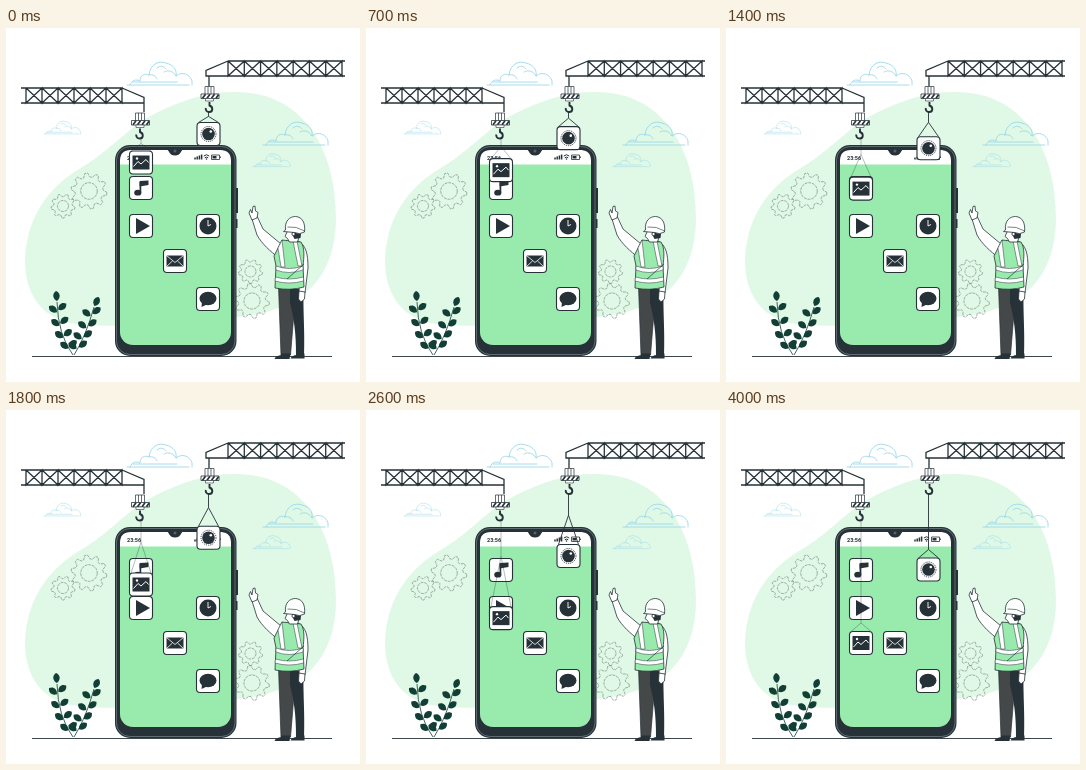
Write an HTML page that moves like this. It is 354x354 px and loops after 5 s.

```html
<!DOCTYPE html>
<html lang="en">
<head>
<meta charset="utf-8">
<title>App installation</title>
<style>
html, body { margin: 0; width: 100%; height: 100%; overflow: hidden; background: #fff; }
svg { display: block; width: 100vw; height: 100vh; }
.line { fill: none; stroke: #263238; }
.paper { fill: #fff; stroke: #263238; stroke-width: .8; stroke-linejoin: round; }
.dark { fill: #263238; }
.cloud { fill: none; stroke: #92d3e9; stroke-width: .8; stroke-linecap: round; }
.gear { fill: none; stroke: #6a7c77; stroke-width: .6; stroke-dasharray: 3 .8; }
text { font: bold 5.5px Roboto, Arial, sans-serif; fill: #263238; }
</style>
</head>
<body>
<svg viewBox="0 0 354 354">
  <defs>
    <g id="cloud">
      <path d="M0 24H62M6 21H50M3 24C5 19 9 18 13 20C13 14 18 12 22 14C23 4 31 -1 39 2C47 4 50 9 49 15C55 10 63 13 65 20V24M22 14C26 13 29 15 30 18M37 11C42 8 47 11 49 15M30 7C33 4 37 5 39 8"/>
    </g>
    <g id="tile"><rect class="paper" x="-11.5" y="-11.5" width="23" height="23" rx="3.5" style="stroke-width:1.1"/></g>
    <g id="tackle">
      <path class="line" d="M-4 8V.5H5V8M-1 .5V8M2 .5V8" stroke-width=".7"/>
      <rect class="paper" x="-8" y="8" width="18" height="4.5"/>
      <path class="line" d="M-6.500 12.300l3-4M-2 12.300l3-4M2.500 12.300l3-4M7 12.300l2.500-3.500" stroke-width="1.700"/>
      <path class="paper" d="M-3.500 12.500H4.500V15H-3.500Z" style="stroke-width:.6"/>
      <path class="line" d="M.5 16V19.500C4.500 21 4 26 .2 26C-2.500 26 -3.500 24 -3.200 22" stroke-width="1.900"/>
    </g>
  </defs>

  <path fill="#e0f9e6" d="M19 233C20 198 35 164 73 141C103 124 120 101 148 86C176 72 200 64 228 64C298 63 330 122 330 190C330 248 298 281 238 288C180 299 110 300 72 296C38 293 19 268 19 233Z"/>

  <g class="cloud">
    <use href="#cloud" x="121" y="33"/>
    <use href="#cloud" transform="translate(38 92.500) scale(.56)"/>
    <use href="#cloud" x="257" y="93"/>
    <use href="#cloud" transform="translate(247 125) scale(.57)"/>
  </g>
  <g id="gears" class="gear"></g>
  <path class="line" d="M26 328.500H326" stroke-width=".9"/>
  <g id="plant" fill="#123f35" stroke="#123f35" stroke-width=".8"></g>

  <!-- phone -->
  <path class="dark" d="M229 160h3v25h-3zM229 191h2.500v9h-2.500z"/>
  <rect class="dark" x="109" y="117" width="121.500" height="211" rx="15"/>
  <rect x="110.500" y="118.500" width="118.500" height="208" rx="13.500" fill="none" stroke="#78868b" stroke-width=".7"/>
  <rect x="114" y="122" width="111" height="195" rx="13" fill="#98ebad"/>
  <path fill="#fff" d="M114 136.500V133Q114 122 125 122H214Q225 122 225 133V136.500Z"/>
  <path class="dark" d="M161 121.500C163 122 163 127.500 169 127.500S175 122 177 121.500Z"/>
  <circle cx="169" cy="123" r="1.500" fill="#53636a"/>
  <text x="121" y="131.500">23:56</text>
  <path class="line" d="M189 131.500v-2M191.200 131.500v-3M193.400 131.500v-4M195.600 131.500v-5" stroke-width="1.500"/>
  <path class="line" d="M197.800 128Q200.500 125.500 203.200 128M198.800 129.800Q200.500 128.300 202.200 129.800" stroke-width="1"/>
  <circle class="dark" cx="200.500" cy="131" r=".8"/>
  <path class="line" d="M205.500 127H213.500V131.500H205.500ZM214.500 128.500v1.500" stroke-width=".8"/>
  <path class="dark" d="M206.500 128h4v2.500h-4z"/>

  <!-- app tiles -->
  <g transform="translate(135 160)">
    <use href="#tile"/>
    <path class="line" d="M-.6 4.500V-6" stroke-width="1.700"/>
    <path class="dark" d="M-1.400 -7L7.500 -7.500V-3L-1.400 -1.500Z"/>
    <ellipse class="dark" cx="-3.200" cy="4.700" rx="3.600" ry="2.900"/>
  </g>
  <g transform="translate(135 198)">
    <use href="#tile"/><path class="dark" d="M-5 -8L9 0L-5 8Z"/>
  </g>
  <g transform="translate(202 198)">
    <use href="#tile"/><circle class="dark" r="8.500"/>
    <path d="M0 -6V0L3 -1.500" fill="none" stroke="#fff" stroke-width=".9"/>
  </g>
  <g transform="translate(169 233)">
    <use href="#tile"/><path class="dark" d="M-8.500 -5.500H8.500V5.500H-8.500Z"/>
    <path d="M-8.500 -5.500L0 1.500L8.500 -5.500M-8.500 5.500L-2.500 0M8.500 5.500L2.500 0" fill="none" stroke="#fff" stroke-width=".8"/>
  </g>
  <g transform="translate(202 271)">
    <use href="#tile"/><ellipse class="dark" cy="-.5" rx="8.500" ry="6.800"/>
    <path class="dark" d="M-6 3L-6.500 8L0 5Z"/>
  </g>

  <!-- cranes -->
  <g id="cranes" class="line" stroke-width="1.300"></g>
  <use href="#tackle" x="133.500" y="84.500"/>
  <use href="#tackle" x="203" y="58"/>

  <!-- moving loads -->
  <path id="photoRope" class="line" stroke-width=".6" opacity=".55"/>
  <g id="photo">
    <use href="#tile"/><path class="dark" d="M-8.500 -7H8.500V7H-8.500Z"/>
    <path d="M-7.500 4L-3 -1L0 1.500L5 -3L7.500 0" fill="none" stroke="#fff" stroke-width="1"/>
    <circle cx="-4" cy="-4" r="1.200" fill="#fff"/>
  </g>
  <path id="lensRope" class="line" stroke-width=".9"/>
  <g id="lens">
    <use href="#tile"/>
    <circle class="line" r="7.500" stroke-width=".9" stroke-dasharray="1.200 1"/>
    <circle class="dark" r="6.300"/>
    <circle cx="2.300" cy="-2.500" r="1.300" fill="#fff"/>
  </g>

  <!-- worker -->
  <path fill="#454849" stroke="#263238" stroke-width=".7" d="M272.500 258H290L288 285L284.500 327H275Z"/>
  <path class="dark" d="M284 261H297.500C297 285 299 305 298 327H290C290 305 288 290 284 275Z"/>
  <path class="dark" d="M275 325.500h9.500l-1 5.500h-15q.5-3 6.500-4zM290 325.500h8.500v5h-14q1-2.500 5.500-3.500z"/>
  <path class="paper" d="M273 230C264 223 256 216 251 207L246 191L251 188L257 201L275 216Z"/>
  <path class="paper" d="M246 192L243 185L244.500 181.500L246 185L247 178.500L249 178L249.500 183L252 184.500L251 190Z"/>
  <path class="paper" d="M292 213C300 217 302 226 302 240L299 265L293 264L294 235Z"/>
  <path class="paper" d="M293 263L299 264L298.500 271L295 274L292.500 271Z"/>
  <path fill="#98ebad" stroke="#263238" stroke-width=".8" d="M276 212L295 214C299 220 298 229 297 238L298 259Q284 263 269 260L270 238L268 228Z"/>
  <path fill="#fff" stroke="#263238" stroke-width=".5" d="M270 238Q283 243 297 238V242Q283 247 270 242ZM269.500 249Q283 253 297.500 249V253Q283 257 269 253ZM276 212L279 239H275L272 220ZM291 213L296 238H292L287 213Z"/>
  <path class="line" d="M298 236L281 251" stroke-width=".7"/>
  <g transform="translate(1.500 0)">
    <path class="paper" d="M280 203L277.500 208.500L280 210.500L282 214H290L293 204Z"/>
    <path class="dark" d="M284 203L294 202L293 210L287 211L285 207Z"/>
    <circle class="paper" cx="286" cy="206" r="1.600"/>
    <path class="paper" d="M278 202C277 193 282 188.500 288 188.500C295 189 298 195 297 204Q292 207 287 204.500L276 203.500Z"/>
    <path class="line" d="M280 199Q289 198 297 203" stroke-width=".6"/>
  </g>
</svg>
<script>
const $ = id => document.getElementById(id);

function gear(x, y, r, teeth) {
  const points = [];
  for (let i = 0; i < teeth * 4; i++) {
    const a = (i + .5) / (teeth * 4) * 2 * Math.PI;
    const d = i % 4 < 2 ? r : r * .78;
    points.push((x + d * Math.cos(a)).toFixed(1) + "," + (y + d * Math.sin(a)).toFixed(1));
  }
  return `<polygon points="${points.join(" ")}"/><circle cx="${x}" cy="${y}" r="${r * .46}"/>`;
}
$("gears").innerHTML = gear(83, 163, 18, 10) + gear(57, 178, 12, 9) +
  gear(244.5, 243.5, 12, 9) + gear(246, 273, 17.5, 10);

function truss(x, y, width, cells) {
  const step = width / cells;
  let d = `M${x} ${y}h${width}M${x} ${y + 15}h${width}`;
  for (let i = 0; i < cells; i++)
    d += `M${x + i * step} ${y}v15l${step} -15v15l${-step} -15`;
  return d;
}
$("cranes").innerHTML =
  `<path d="${truss(20, 60, 96, 6)}M15 60H20M15 75H20M116 60L138 69.500V84M116 75H138"/>` +
  `<path d="${truss(222, 33, 114, 7)}M336 33h3M336 48h3M222 33L200 42.500V48H222M203 48V58"/>`;

// A stem is a quadratic curve with leaves in pairs along it.
function stem(x0, y0, cx, cy, x1, y1) {
  const at = (a, b, c, u) => a * (1 - u) ** 2 + 2 * b * u * (1 - u) + c * u * u;
  let out = `<path fill="none" d="M${x0} ${y0}Q${cx} ${cy} ${x1} ${y1}"/>`;
  const leaf = (u, turn) => {
    const x = at(x0, cx, x1, u), y = at(y0, cy, y1, u);
    out += `<path stroke="none" d="M0 -1C-4.500 -4 -4 -9 0 -11C4 -9 4.500 -4 0 -1" transform="translate(${x} ${y}) rotate(${turn})"/>`;
  };
  for (let i = 0; i < 4; i++) {
    leaf(.14 + i * .23, -52);
    leaf(.18 + i * .23, 52);
  }
  leaf(1, x1 < x0 ? -5 : 25);
  return out;
}
$("plant").innerHTML = stem(67, 327, 52, 307, 51, 274) + stem(68, 327, 80, 308, 88, 279);

// Ease-in along cubic-bezier(.42, 0, 1, 1).
function easeIn(x) {
  let low = 0, high = 1;
  for (let i = 0; i < 24; i++) {
    const s = (low + high) / 2;
    const value = 1.26 * s * (1 - s) ** 2 + 3 * s * s * (1 - s) + s ** 3;
    if (value < x) low = s; else high = s;
  }
  return low * low * (3 - 2 * low);
}

// The sling stretches on the way down and is tight once the load has landed.
function lower(name, x, hook, from, to, e) {
  const y = from + (to - from) * e, top = y - 11.5;
  const apex = e < 1 ? hook + (top - hook) * .42 : top - 8.5;
  $(name).setAttribute("transform", `translate(${x} ${y})`);
  $(name + "Rope").setAttribute("d",
    `M${x} ${hook}V${apex}M${x - 10} ${top}L${x} ${apex}L${x + 10} ${top}`);
}

function draw() {
  const time = Math.floor(performance.now() % 5000 / 100) * 100;
  const e = time >= 3100 ? 1 : easeIn(time / 3100);
  lower("photo", 135, 110, 134.5, 233, e);
  lower("lens", 202.5, 84, 106, 159.5, e);
  requestAnimationFrame(draw);
}
draw();
</script>
</body>
</html>
```
